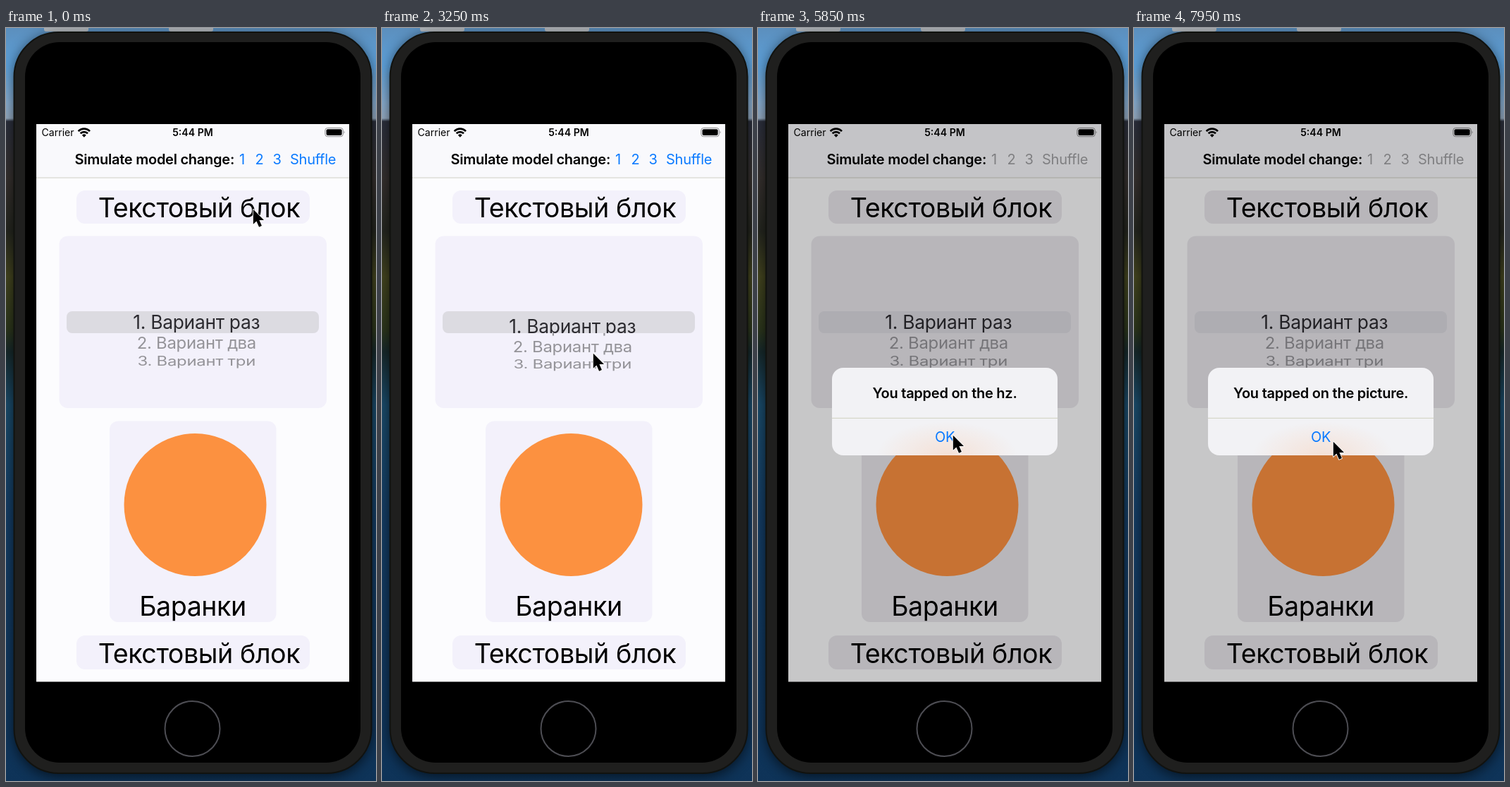
Recreate the animation shown at these times as an HTML page. Size 525 by 1066 pixels, loop 8 s.

```html
<!DOCTYPE html>
<html lang="ru">
<head>
<meta charset="utf-8">
<title>Picker demo</title>
<style>
  html, body { margin: 0; width: 100%; height: 100%; overflow: hidden; background: #0b2747; }
  svg { display: block; width: 100%; height: 100%; }
  text { font-family: Inter, Roboto, sans-serif; }
  .middle { text-anchor: middle; }
  .big { font-size: 37.6px; letter-spacing: -.011em; }
  .body { font-size: 20px; letter-spacing: -.0125em; }
  .status { font-size: 14.1px; }
  .bold { font-weight: 600; }
  .card { fill: var(--card); }
  .row { font-size: 23.9px; letter-spacing: -.011em; fill: #949398; }
  .picked { font-size: 26.4px; fill: #2b2a2f; }
</style>
</head>
<body>
<svg id="stage" viewBox="0 0 525 1066" preserveAspectRatio="none">
  <defs>
    <linearGradient id="scenery" x2="0" y2="1">
      <stop offset="0" stop-color="#5c8fbd"/>
      <stop offset=".05" stop-color="#5c9fd8"/>
      <stop offset=".1" stop-color="#88add0"/>
      <stop offset=".12" stop-color="#93a9bf"/>
      <stop offset=".124" stop-color="#2b2f3c"/>
      <stop offset=".2" stop-color="#35302e"/>
      <stop offset=".27" stop-color="#24261f"/>
      <stop offset=".33" stop-color="#43441f"/>
      <stop offset=".4" stop-color="#2c361c"/>
      <stop offset=".43" stop-color="#17292b"/>
      <stop offset=".5" stop-color="#1a4a69"/>
      <stop offset=".65" stop-color="#143c63"/>
      <stop offset="1" stop-color="#0e3358"/>
    </linearGradient>
    <radialGradient id="glow">
      <stop offset="0" stop-color="#ff9c5a" stop-opacity=".2"/>
      <stop offset="1" stop-color="#ff9c5a" stop-opacity="0"/>
    </radialGradient>
    <filter id="blur" x="-10%" y="-10%" width="120%" height="120%"><feGaussianBlur stdDeviation="9"/></filter>
    <clipPath id="band"><rect x="86" y="401" width="358" height="31"/></clipPath>
    <clipPath id="outside"><path d="M75 295H455V401H75ZM75 432H455V538H75Z"/></clipPath>
    <clipPath id="alertShape"><rect x="105" y="481" width="320" height="124" rx="16"/></clipPath>
  </defs>

  <rect width="525" height="1066" fill="url(#scenery)"/>
  <path d="M54 0H117V2Q117 5 114 5H57Q54 5 54 2ZM231 0H294V2Q294 5 291 5H234Q231 5 231 2Z" fill="#b4b9be"/>

  <rect x="11" y="9" width="508" height="1051" rx="63" opacity=".6" filter="url(#blur)"/>
  <rect x="11.5" y="6" width="507" height="1049" rx="63" fill="#1f1f1e" stroke="#11120f" stroke-width="2"/>
  <rect x="27" y="20" width="476" height="1020" rx="49"/>
  <circle cx="264.5" cy="992" r="39" fill="none" stroke="#4d4d53" stroke-width="2"/>

  <rect x="43" y="136" width="444" height="789.5" fill="#fcfcfe"/>
  <rect x="43" y="136" width="444" height="76" fill="#f9f9fc"/>
  <path d="M43 212H487" stroke="#cfcfc4"/>

  <text class="status" x="50.5" y="153">Carrier</text>
  <g fill="none" stroke="#000" stroke-width="2.7">
    <path d="M102.6 146.1A11.6 11.6 0 0 1 119 146.1M105.6 149.3A7.3 7.3 0 0 1 116 149.3"/>
    <path d="M110.8 154.8L107.9 151.7A4.2 4.2 0 0 1 113.7 151.7Z" fill="#000" stroke="none"/>
  </g>
  <text class="status bold middle" x="265" y="153">5:44 PM</text>
  <rect x="452.8" y="141.5" width="25.5" height="12.2" rx="3.5" fill="none" stroke="#8d8d8f"/>
  <rect x="454.5" y="143.2" width="22.1" height="8.8" rx="2"/>
  <path d="M479.6 145.8Q481.6 147.6 479.6 149.5Z" fill="#8d8d8f"/>

  <text class="body bold" x="97.5" y="193">Simulate model change:</text>
  <g id="links" class="body">
    <text x="331" y="193">1</text><text x="353.5" y="193">2</text>
    <text x="378.5" y="193">3</text><text x="403" y="193">Shuffle</text>
  </g>

  <rect class="card" x="100" y="230" width="331" height="47" rx="12"/>
  <text class="big middle" x="274" y="268">Текстовый блок</text>

  <rect class="card" x="75.5" y="294.5" width="379.5" height="243.5" rx="12"/>
  <rect x="86" y="401" width="358" height="31" rx="8" fill="#dcdbe1"/>
  <g id="wheel" clip-path="url(#outside)"></g>
  <g id="lens" clip-path="url(#band)"></g>

  <rect class="card" x="147" y="556.5" width="236.5" height="284.5" rx="12"/>
  <circle cx="268.5" cy="675" r="101" fill="#fc9140"/>
  <text class="big middle" x="265" y="832">Баранки</text>

  <rect class="card" x="100" y="860" width="331" height="48" rx="12"/>
  <text class="big middle" x="274" y="899">Текстовый блок</text>

  <rect id="dim" x="43" y="136" width="444" height="789.5"/>

  <g id="alert">
    <g clip-path="url(#alertShape)">
      <rect x="105" y="481" width="320" height="124" fill="#f2f2f5"/>
      <ellipse cx="268" cy="605" rx="100" ry="48" fill="url(#glow)"/>
    </g>
    <path d="M105 552.3H425" stroke="#cfd0bd"/>
    <text id="message" class="body bold middle" x="265" y="524"></text>
    <text class="body middle" x="265" y="586" fill="#0a7aff">OK</text>
  </g>

  <g id="pointer">
    <circle id="touch" cy="6.5" r="24" fill="#a3a3a3" fill-opacity=".45" stroke="#777" stroke-opacity=".55" stroke-width="1.5"/>
    <path d="M.8 .8V21.8L5.4 17.4L9.1 25.8L12.9 24.1L9.4 16H16Z" stroke="#fff" stroke-width="1.7" stroke-linejoin="round" paint-order="stroke"/>
  </g>
</svg>
<script>
const LOOP = 8000, STEP = 50;
const ROW_ANGLE = Math.PI / 9, RADIUS = 84.8;
const OPTIONS = ['1. Вариант раз', '2. Вариант два', '3. Вариант три'];
const $ = id => document.getElementById(id);

// Each key is [time, ...values].
const POINTER = [
  [0, 350, 256], [100, 350, 256], [750, 303, 442], [850, 303, 442], [1350, 305, 410],
  [1900, 305, 410], [2800, 299, 460], [3400, 299, 460], [4150, 323, 247], [4800, 323, 247],
  [5500, 276, 576], [5850, 276, 576], [6100, 278, 567], [6900, 271, 727],
  [7450, 271, 727], [7900, 282, 585]
];
const WHEEL = [[850, 0], [1350, 1], [1900, 1], [2800, -.22], [3200, -.22], [3500, 0]];
const ALERT = [[4400, 0], [4650, 1], [5850, 1], [6150, 0], [7500, 0], [7750, 1]];
const TOUCHES = [[800, 3200], [4230, 4380], [5640, 5780], [7330, 7480]];

const ease = u => u * u * (3 - 2 * u);

function valueAt(keys, t) {
  const next = keys.findIndex(key => key[0] > t);
  if (next === 0) return keys[0].slice(1);
  if (next < 0) return keys[keys.length - 1].slice(1);
  const a = keys[next - 1], b = keys[next];
  const u = ease((t - a[0]) / (b[0] - a[0]));
  return a.slice(1).map((v, i) => v + (b[i + 1] - v) * u);
}

function addRows(parent, className, y) {
  return OPTIONS.map(label => {
    const row = document.createElementNS('http://www.w3.org/2000/svg', 'text');
    row.setAttribute('class', 'row middle ' + className);
    row.setAttribute('y', y);
    row.textContent = label;
    return parent.appendChild(row);
  });
}

const layers = [addRows($('wheel'), '', 8.6), addRows($('lens'), 'picked', 9.5)];

function mix(from, to, u) {
  return `rgb(${from.map((c, i) => Math.round(c + (to[i] - c) * u))})`;
}

function draw(t) {
  const [position] = valueAt(WHEEL, t);
  for (const rows of layers) rows.forEach((row, i) => {
    const angle = (i - position) * ROW_ANGLE;
    const y = 416.8 + RADIUS * Math.sin(angle);
    row.setAttribute('transform', `translate(270.3 ${y}) scale(1 ${Math.cos(angle)})`);
  });

  const [shown] = valueAt(ALERT, t);
  const size = t < 4700 || t > 7000 ? 1.15 - .15 * shown : 1;
  $('dim').setAttribute('opacity', .21 * shown);
  $('alert').setAttribute('opacity', shown);
  $('alert').setAttribute('transform', `translate(265 543) scale(${size}) translate(-265 -543)`);
  $('message').textContent = `You tapped on the ${t < 7000 ? 'hz' : 'picture'}.`;
  $('links').setAttribute('fill', mix([10, 122, 255], [160, 160, 163], shown));
  $('stage').style.setProperty('--card', mix([243, 241, 251], [233, 231, 236], shown));

  const [x, y] = valueAt(POINTER, t);
  const pressed = TOUCHES.some(([start, end]) => t >= start && t < end);
  $('pointer').setAttribute('transform', `translate(${x} ${y})`);
  $('touch').setAttribute('opacity', pressed ? 1 : 0);
}

const start = performance.now();
function tick(now) {
  const t = Math.max(0, now - start) % LOOP;
  draw(Math.floor(t / STEP) * STEP);
  requestAnimationFrame(tick);
}
draw(0);
requestAnimationFrame(tick);
</script>
</body>
</html>
```
